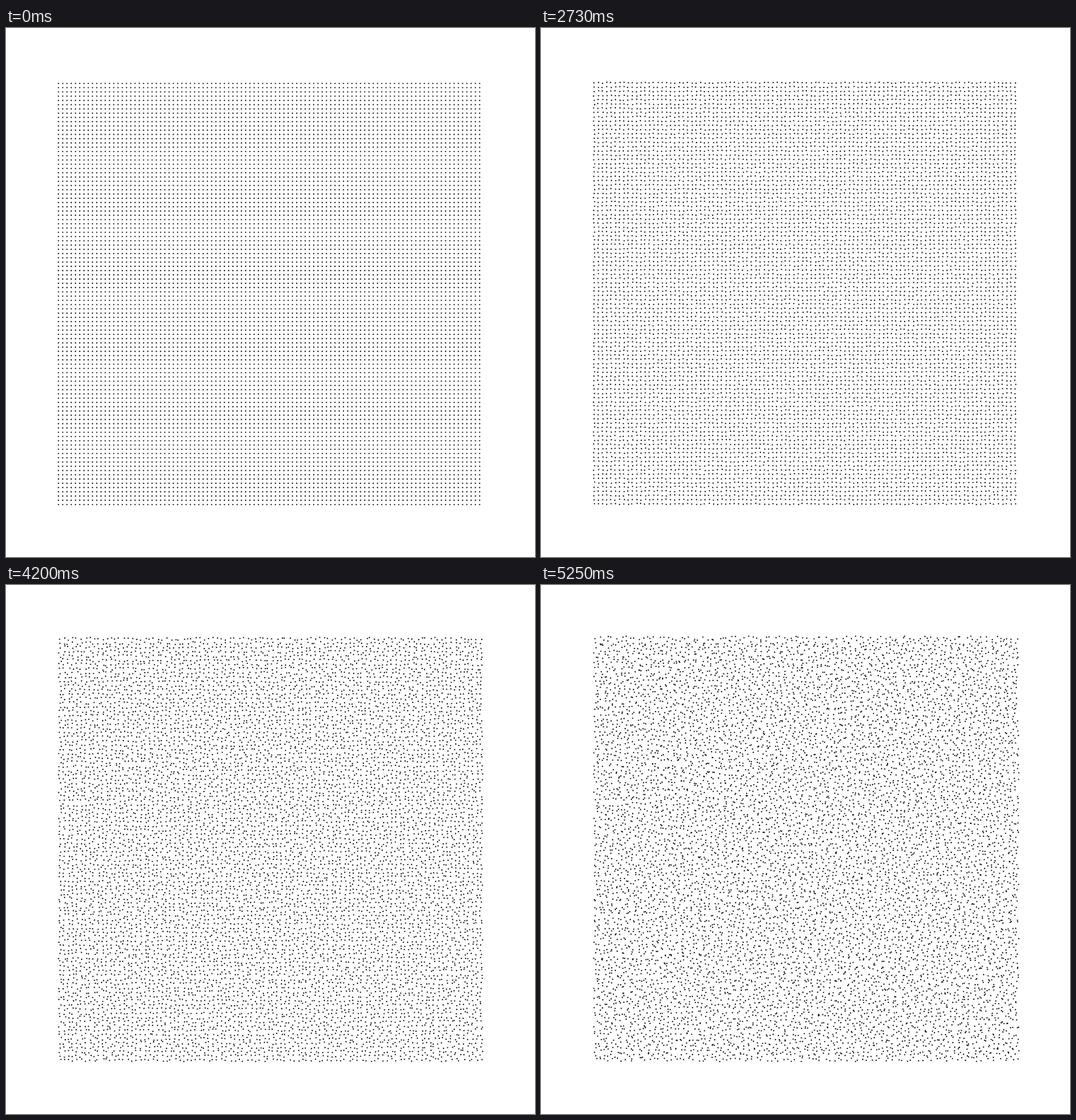
Recreate the animation shown at these times as an HTML page with a canvas. Size 748 by 748 pixels, loop 7000 ms.

```html
<!DOCTYPE html>
<html lang="en">
<head>
<meta charset="utf-8">
<title>Grid to jitter</title>
<style>
  html, body { margin: 0; width: 100%; height: 100%; overflow: hidden; background: #fff; }
  canvas { display: block; width: 748px; height: 748px; }
</style>
</head>
<body>
<canvas id="stage" width="748" height="748"></canvas>
<script>
const SIZE = 748, COUNT = 100, PITCH = 6.015;
const LEFT = 74.2, BOTTOM = 673.8, RADIUS = 0.92;
const LOOP = 7000, HOLD = 1820, STEP = 70, STEPS = 50;

const ctx = document.getElementById('stage').getContext('2d');

function seeded(seed) {
  return () => {
    seed = (seed + 0x6D2B79F5) | 0;
    let n = Math.imul(seed ^ (seed >>> 15), seed | 1);
    n ^= n + Math.imul(n ^ (n >>> 7), n | 61);
    return ((n ^ (n >>> 14)) >>> 0) / 4294967296;
  };
}

// Each dot drifts right and up to a random place inside its own cell.
const random = seeded(2024);
const dots = Array.from({ length: COUNT * COUNT }, (_, i) => ({
  col: i % COUNT,
  row: Math.floor(i / COUNT),
  dx: random(),
  dy: random()
}));

function draw(amount) {
  ctx.fillStyle = '#fff';
  ctx.fillRect(0, 0, SIZE, SIZE);
  ctx.fillStyle = '#000';
  for (const d of dots) {
    const x = LEFT + (d.col + d.dx * amount) * PITCH;
    const y = BOTTOM - (d.row + d.dy * amount) * PITCH;
    ctx.beginPath();
    ctx.arc(x, y, RADIUS, 0, Math.PI * 2);
    ctx.fill();
  }
}

function stepAt(t) {
  const step = Math.floor((t - HOLD) / STEP) + 1;
  return Math.max(0, Math.min(STEPS, step));
}

const start = performance.now();
let shown = -1;

function tick() {
  const step = stepAt((performance.now() - start) % LOOP);
  if (step !== shown) {
    draw(step / STEPS);
    shown = step;
  }
  requestAnimationFrame(tick);
}
tick();
</script>
</body>
</html>
```
